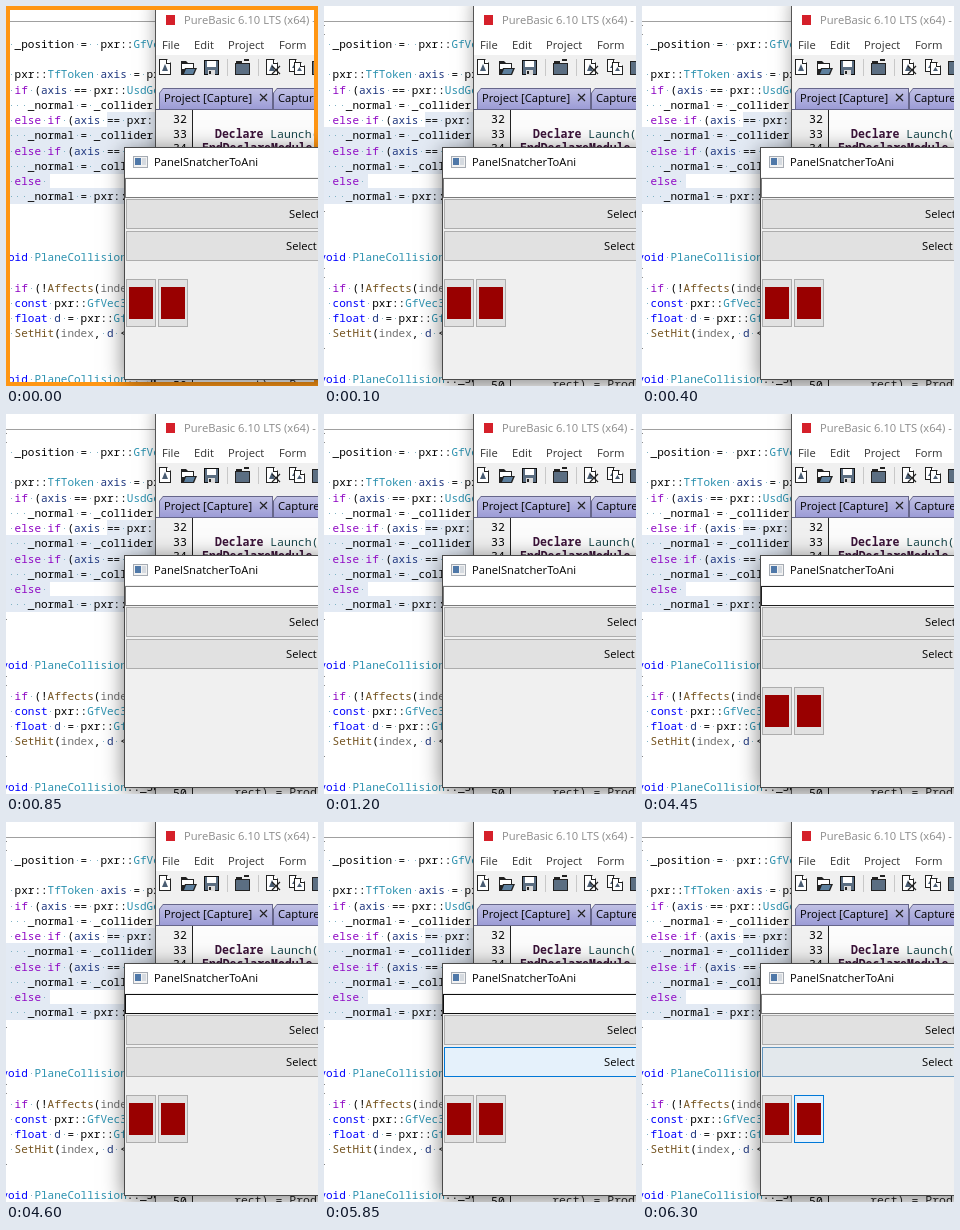
Animation of 312x380 px, one loop 6350 ms. Source, as an HTML page with a canvas:

```html
<!DOCTYPE html>
<html lang="en">
<head>
<meta charset="utf-8">
<title>Desktop</title>
<style>
html, body { margin: 0; width: 100%; height: 100%; overflow: hidden; background: #fff; }
canvas { display: block; }
</style>
</head>
<body>
<canvas id="stage" width="312" height="380"></canvas>
<script>
const W = 312, H = 380, LOOP = 6350;
const ctx = document.getElementById('stage').getContext('2d');
const UI = '11.2px "Open Sans", "Noto Sans", sans-serif';
const MONO = '11px "Noto Sans Mono", "DejaVu Sans Mono", monospace';
const EDIT = '11.5px "Noto Sans Mono", "DejaVu Sans Mono", monospace';
const PITCH = 6.6, LEADING = 15.22, EDIT_PITCH = 6.9;

const code = [
  '{', '  _position =  pxr::GfVec3d', '', '  pxr::TfToken axis = pxr',
  '  if (axis == pxr::UsdGeom', '    _normal = _collider',
  '  else if (axis == pxr::Usd', '    _normal = _collider',
  '  else if (axis == pxr::Usd', '    _normal = _collider',
  '  else ', '    _normal = pxr::GfVec', '}', '', '',
  'void PlaneCollision::_Do', '{', '  if (!Affects(index', '  const pxr::GfVec3d',
  '  float d = pxr::GfVec', '  SetHit(index, d < 0', '}', '',
  'void PlaneCollision::_Sol'
];

function rect(x, y, w, h, fill) {
  ctx.fillStyle = fill;
  ctx.fillRect(x, y, w, h);
}

function box(x, y, w, h, fill, line) {
  rect(x, y, w, h, line);
  rect(x + 1, y + 1, w - 2, h - 2, fill);
}

function text(s, x, y, color = '#000', font = UI) {
  ctx.font = font;
  ctx.fillStyle = color;
  ctx.fillText(s, x, y);
}

function poly(points, fill) {
  ctx.fillStyle = fill;
  ctx.beginPath();
  points.forEach(([x, y]) => ctx.lineTo(x, y));
  ctx.fill();
}

function shadowed(blur, alpha, draw) {
  ctx.save();
  ctx.shadowColor = `rgba(0,0,0,${alpha})`;
  ctx.shadowBlur = blur;
  ctx.shadowOffsetY = 3;
  draw();
  ctx.restore();
}

const ramp = (t, from, span) => Math.max(0, Math.min(1, (t - from) / span));

function mix(a, b, k) {
  return `rgb(${a.map((v, i) => Math.round(v + (b[i] - v) * k))})`;
}

function tokenColor(s) {
  if (/^(if|else)$/.test(s)) return '#8f08c4';
  if (/^(void|const|float)$/.test(s)) return '#0000ff';
  if (/^(Tf|Gf|Usd|Plane)/.test(s)) return '#2b91af';
  if (/^(Affects|SetHit)$/.test(s)) return '#74531f';
  if (/^(axis|d)$/.test(s)) return '#1f377f';
  if (s === 'index') return '#707070';
  return '#000';
}

function drawCode() {
  rect(0, 0, 149, H, '#fff');
  rect(0, 15, 149, 1, '#a0a0a0');
  code.forEach((line, row) => {
    const y = Math.round(42 + LEADING * (row - 1));
    if (row > 5 && row < 12) {
      const left = row === 6 ? 101 : 0;
      rect(left, y - 12, (row === 10 ? 44 : 149) - left, 16, '#e3eaf4');
    }
    for (const m of line.matchAll(/\w+|\s|[^\w\s]+/g)) {
      const x = -4.6 + m.index * PITCH;
      if (m[0] === ' ') rect(Math.round(x + 2.8), y - 4, 1, 1, '#7fb2c4');
      else text(m[0], x, y, tokenColor(m[0]), MONO);
    }
  });
}

function pageIcon(x, y = 53, w = 12, h = 16) {
  box(x, y, w, h, '#fff', '#222');
  poly([[x + w - 4, y], [x + w, y], [x + w, y + 4]], '#f0f0f0');
  rect(x + w - 5, y, 1, 5, '#222');
  rect(x + w - 5, y + 4, 5, 1, '#222');
  poly([[x + 3, y + h - 4], [x + w / 2, y + 5], [x + w - 3, y + h - 4]], '#4a5d73');
}

function folderIcon(x) {
  poly([[x, 69], [x, 55], [x + 5, 55], [x + 7, 57], [x + 13, 57], [x + 13, 69]], '#222');
  rect(x + 1, 58, 11, 5, '#fff');
  poly([[x + 1, 69], [x + 4, 62], [x + 16, 62], [x + 13, 69]], '#222');
  poly([[x + 3, 68], [x + 5, 63], [x + 14, 63], [x + 12, 68]], '#5d7f9d');
}

function closedFolderIcon(x) {
  box(x, 57, 15, 12, '#5b6e82', '#222');
  rect(x + 1, 55, 6, 3, '#222');
  rect(x + 9, 53, 5, 2, '#222');
}

function diskIcon(x) {
  box(x, 54, 15, 15, '#5b6e82', '#111');
  rect(x + 3, 55, 9, 6, '#fff');
  rect(x + 4, 64, 7, 5, '#ddd');
  rect(x + 5, 65, 2, 3, '#222');
}

function cross(x, y, size, color) {
  ctx.strokeStyle = color;
  ctx.lineWidth = 1.2;
  ctx.beginPath();
  ctx.moveTo(x, y); ctx.lineTo(x + size, y + size);
  ctx.moveTo(x + size, y); ctx.lineTo(x, y + size);
  ctx.stroke();
}

function drawToolbar() {
  pageIcon(153);
  folderIcon(175);
  diskIcon(198);
  closedFolderIcon(229);
  pageIcon(260);
  cross(266, 60, 8, '#222');
  pageIcon(283, 53, 11, 13);
  pageIcon(288, 56, 11, 13);
  box(306, 55, 12, 14, '#5b6e82', '#222');
  [221, 252].forEach(x => rect(x, 53, 1, 17, '#c8c8c8'));
}

function tab(x, w, label) {
  const shade = ctx.createLinearGradient(0, 83, 0, 103);
  shade.addColorStop(0, '#c0c0e4');
  shade.addColorStop(1, '#9c9cd6');
  poly([[x, 103], [x, 87], [x + 4, 82], [x + w, 82], [x + w, 103]], '#66668a');
  poly([[x + 1, 103], [x + 1, 87], [x + 4, 83], [x + w - 1, 83], [x + w - 1, 103]], shade);
  text(label, x + 5, 96);
}

function drawEditor() {
  shadowed(16, 0.32, () => rect(149, -10, 180, 410, '#555'));
  rect(150, 0, 162, H, '#f0f0f0');
  rect(150, 0, 162, 49, '#fff');
  rect(160, 9, 9, 10, '#d5202a');
  text('PureBasic 6.10 LTS (x64) - ', 178, 18, '#8a8a8a');
  [['File', 156], ['Edit', 188], ['Project', 222], ['Form', 273]]
    .forEach(([s, x]) => text(s, x, 43, '#333'));
  drawToolbar();

  tab(153, 114, 'Project [Capture]');
  tab(267, 60, 'Capture');
  cross(254, 88, 7, '#222');
  rect(150, 103, 162, 1, '#66668a');

  rect(187, 104, 125, H - 104, '#fcfcfc');
  rect(186, 104, 1, H - 104, '#222');
  const bold = 'bold ' + EDIT;
  [32, 33, 34].forEach((n, i) => text(n, 167, 117 + Math.round(14.6 * i), '#000', EDIT));
  text('Declare', 209, 132, '#3a1238', bold);
  text('Launch(', 209 + 8 * EDIT_PITCH, 132, '#17464a', EDIT);
  text('EndDeclareModule', 196, 146, '#3a1238', bold);
  text('50', 167, 383, '#000', EDIT);
  text('rect) = Prod', 228, 382, '#222', EDIT);
}

function button(x, y, w, h, hot = 0) {
  box(x, y, w, h, mix([225, 225, 225], [229, 241, 251], hot),
    mix([173, 173, 173], [0, 120, 215], hot));
}

function drawDialog(t) {
  shadowed(20, 0.5, () => rect(118, 141, 210, 233, '#4a4a4a'));
  rect(119, 142, 193, 231, '#f0f0f0');
  rect(119, 142, 193, 29, '#fff');

  box(127, 150, 15, 12, '#f2f2f2', '#a4aab2');
  rect(129, 152, 6, 7, '#4f78a8');
  rect(136, 152, 4, 7, '#d5dae0');
  text('PanelSnatcherToAni', 148, 160);

  const inputHot = (t >= 4450 ? 0.85 + 0.15 * ramp(t, 4450, 150) : 0) * (1 - ramp(t, 5850, 350));
  box(119, 172, 210, 20, '#fff', mix([122, 122, 122], [15, 15, 15], inputHot));

  const selectHot = t >= 5850 ? 1 - ramp(t, 6100, 350) : 0;
  button(120, 193, 210, 30);
  button(120, 225, 210, 30, selectHot);
  text('Select', 283, 212);
  text('Select', 280, 244);

  if (t < 850 || t >= 1500) {
    button(120, 273, 30, 48);
    button(152, 273, 30, 48, t >= 6100 ? 1 : 0);
    rect(123, 281, 24, 32, '#990000');
    rect(155, 281, 24, 32, '#990000');
  }
}

function drawFrame(w, color) {
  rect(0, 0, W, w, color);
  rect(0, H - w, W, w, color);
  rect(0, 0, w, H, color);
  rect(W - w, 0, w, H, color);
}

const start = performance.now();

function render(now) {
  const t = Math.max(0, now - start) % LOOP;
  drawCode();
  drawEditor();
  if (t < 50) drawFrame(4, '#ff9614');
  drawDialog(t);
  requestAnimationFrame(render);
}

render(start);
</script>
</body>
</html>
```
